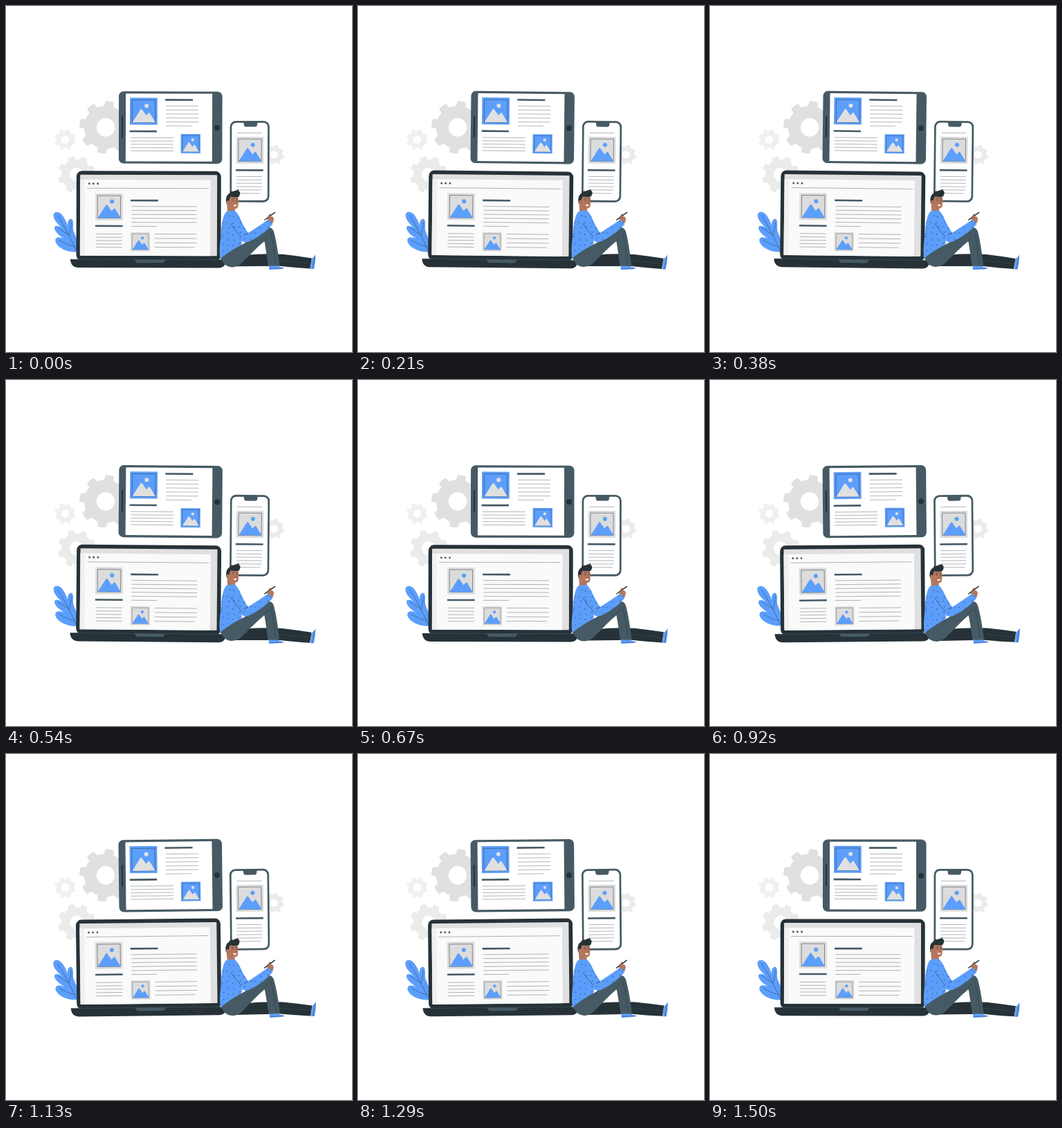
Recreate the animation shown at these times as an HTML page. Size 500x500 px, loop 1540 ms.

```html
<!DOCTYPE html>
<html lang="en">
<head>
<meta charset="utf-8">
<title>Responsive layouts</title>
<style>
  html, body { margin: 0; width: 100%; height: 100%; overflow: hidden; background: #fff; }
  svg { display: block; width: 100%; height: 100%; }
</style>
</head>
<body>
<svg viewBox="0 0 500 500" xmlns="http://www.w3.org/2000/svg"><g id="scene"></g></svg>
<script>
const BLUE = '#5c9efc', INK = '#263238', SLATE = '#455a64', GREY = '#dcdcdc', SKIN = '#b4765d';
const LOOP = 1540, STEPS = 37, TILT = 0.65, LEAD = 60;

const rect = (x, y, r, b, fill, rx = 0) =>
  `<rect x="${x}" y="${y}" width="${r - x}" height="${b - y}" rx="${rx}" fill="${fill}"/>`;
const dot = (x, y, r, fill) => `<circle cx="${x}" cy="${y}" r="${r}" fill="${fill}"/>`;
const shape = (d, fill, extra = '') => `<path d="${d}" fill="${fill}" ${extra}/>`;
const stroke = (d, color = INK, w = 0.6) =>
  `<path d="${d}" fill="none" stroke="${color}" stroke-width="${w}" stroke-linecap="round" stroke-linejoin="round"/>`;

// Rows of thin text rules; the last row may end early.
function rules(x, r, y, gap, n, last = r) {
  let d = '';
  for (let i = 0; i < n; i++) d += `M${x} ${y + i * gap}H${i === n - 1 ? last : r}`;
  return `<path d="${d}" stroke="${INK}" stroke-width=".45" opacity=".8"/>`;
}

function picture(x, y, size, back, front) {
  return `<g transform="translate(${x} ${y}) scale(${size / 39.5})">
    ${rect(0, 0, 39.5, 38.8, back)}
    <rect x="3.2" y="3.2" width="33.2" height="32.4" fill="none" stroke="${INK}" stroke-width=".5"/>
    ${shape('M3.6 35.4L15 17.4Q16.3 15.3 17.8 17.4L23.6 25.6L26.2 22.4Q27.6 20.8 28.9 22.6L36.7 35.4Z', front)}
    ${dot(24, 11.7, 3, front)}</g>`;
}

function gear(cx, cy, out, hole, teeth, phase, fill) {
  const step = 2 * Math.PI / teeth, root = out * 0.82;
  const at = (a, r) => `${(cx + r * Math.cos(a)).toFixed(2)} ${(cy + r * Math.sin(a)).toFixed(2)}`;
  let d = '';
  for (let i = 0; i < teeth; i++) {
    const a = phase * Math.PI / 180 + i * step;
    d += `${i ? 'L' : 'M'}${at(a - step * .29, root)}L${at(a - step * .2, out)}` +
      `A${out} ${out} 0 0 1 ${at(a + step * .2, out)}L${at(a + step * .29, root)}` +
      `A${root} ${root} 0 0 1 ${at(a + step * .71, root)}`;
  }
  d += `ZM${cx - hole} ${cy}a${hole} ${hole} 0 1 0 ${2 * hole} 0a${hole} ${hole} 0 1 0 ${-2 * hole} 0Z`;
  return shape(d, fill, 'fill-rule="evenodd"');
}

function gears() {
  return gear(144, 175.3, 38, 13.3, 8, -81, '#e0e0e0') +
    gear(102, 243.5, 27, 10, 8, -64, '#ebebeb') +
    gear(85.5, 193, 15.3, 5.8, 8, -70, '#f0f0f0') +
    gear(387.5, 215, 14.6, 5.6, 8, -75, '#ebebeb');
}

function leaf() {
  return shape('M102 355.5C90 356 74 350 71.5 340C70.5 333.5 78 333 85 336.5' +
      'C77 332 70 326 70 320.5C70.5 316.5 76 317.5 81 320.5' +
      'C74 315 68 308 68.5 301.5C70 295.5 78 297 82 303C85 307.5 87.5 312 89 317.5' +
      'C88.8 311 91 307.5 94 307.5C98 308.5 97 316 97 322C97.5 328 103 334 103 343Z', BLUE) +
    stroke('M74.5 302.5Q87 322 101.5 353M77 338.5Q89 346 99.5 348M94 312Q94.5 321 92 329M75 320.5Q84 327 92 331', INK, .45);
}

function tablet() {
  return rect(163, 123.5, 312.5, 227.8, SLATE, 7) +
    rect(173, 126.7, 298, 224.6, '#fff') +
    rect(167, 159.5, 169, 191, INK, 1) + dot(305, 175.8, 4, INK) +
    picture(179, 132.7, 39.7, BLUE, '#e0e0e0') +
    rect(230, 134.3, 270, 136.9, SLATE) +
    rules(231, 278, 144.5, 5.75, 6, 268) +
    rect(178.7, 179.9, 218, 182.5, SLATE) +
    rules(180, 242, 190.5, 4.75, 5, 242) +
    picture(252.7, 185, 28.3, BLUE, '#e0e0e0');
}

function phone() {
  return rect(323.5, 166, 380.7, 283.6, SLATE, 8.5) +
    rect(326.2, 168.8, 378, 280.8, '#fff', 6) +
    shape('M342.5 168H364Q362.8 169 362.7 172Q362.5 174.6 359.5 174.6H347Q344 174.6 343.8 172Q343.7 169 342.5 168Z', SLATE) +
    rules(334, 370, 183.5, 1, 1) +
    picture(332.7, 189, 39.5, GREY, BLUE) +
    rect(332, 236, 371.7, 238.6, SLATE) +
    rules(333, 370, 246.5, 4.85, 6, 368);
}

function laptop() {
  return rect(101.7, 238.5, 310.6, 368, INK, 8) +
    rect(107, 244, 305, 361, '#e0e0e0', 1) +
    rect(107, 251, 114, 361, '#f0f0f0') +
    rect(113.7, 251.2, 295.3, 361, '#fafafa') +
    [120.2, 126.2, 132.5].map(x => dot(x, 257, 1.45, SLATE)).join('') +
    rules(117, 293, 263.5, 1, 1) +
    picture(129, 271, 39.6, GREY, BLUE) +
    rect(180, 279.8, 219.8, 282.4, SLATE) +
    rules(181, 276, 289.7, 5.75, 6, 218) +
    rect(129, 316.8, 168.7, 319.3, SLATE) +
    rules(130, 168, 329.5, 4.85, 5) +
    picture(180.2, 327, 28, GREY, BLUE) +
    rules(215, 276, 329.5, 6.35, 4, 273) +
    shape('M93 366.3H318.5Q318 378.3 307 378.3H105Q94 378.3 93 366.3Z', INK) +
    stroke('M94 366.4H318', SLATE, .5) +
    shape('M186 366.5H230.5L228.3 370.2Q227.7 371.2 226 371.2H190.5Q188.7 371.2 188.2 370.2Z', SLATE);
}

// Short seeded dashes on the sweater.
function flecks() {
  let seed = 11, d = '';
  const rnd = () => (seed = (seed * 16807) % 2147483647) / 2147483647;
  for (let y = 302; y < 368; y += 8) {
    for (let x = 311; x < 384; x += 8) {
      const a = rnd() * Math.PI, px = x + rnd() * 4, py = y + rnd() * 4;
      d += `M${px.toFixed(1)} ${py.toFixed(1)}l${(1.7 * Math.cos(a)).toFixed(1)} ${(1.7 * Math.sin(a)).toFixed(1)}`;
    }
  }
  return stroke(d, INK, .55);
}

const knit = (id, d) => `<clipPath id="${id}"><path d="${d}"/></clipPath>` +
  shape(d, BLUE) + `<g clip-path="url(#${id})">${flecks()}</g>`;

function man() {
  const torso = 'M319 297C314 301 312 312 311 326C309.5 342 307.5 355 310 366C317 371 332 360 341 343L337 310Q334 297 330 296Z';
  const arm = 'M329 296C335 298 338 307 342 315Q347 324 350 328Q364 319 379.5 308.5L385.5 315C375 327 362 336 350 341Q343 343 337 336L323 318Z';
  // far leg
  return shape('M332 376.5L346 360Q370 357.5 400 358.8Q420 361 442 364.2L439.5 379.3Q420 378.3 396 375.8Z', INK) +
    stroke('M394 367.5Q415 369 436 371.5', SLATE, .4) +
    shape('M442 365Q445.5 362.5 447.6 358.6Q447.6 370 445.3 379.8H439.8Z', BLUE) +
    stroke('M446.2 362L443.5 379', INK, .5) +
    // head
    shape('M319 284L320 298Q325 302 331 296L330.5 291Z', SKIN) +
    shape('M320.5 276Q328 272 335 275Q336.5 283 335.3 290Q333.5 294 328 293Q321 290.5 320 284Z', SKIN) +
    shape('M318.5 286C317 280 318 274 322 271.5C324 271 323 267.5 327 268C330 268.5 331 266 334 266.5' +
      'C335 264.5 337 265.5 336 267.5C339 268 338.5 272 336.5 275.5C331 277.5 327 275.5 324 276C322.5 279 322.5 282 321.5 285Z', INK) +
    dot(320.5, 283.5, 2.2, SKIN) +
    dot(328.3, 281.5, .65, INK) + dot(333.8, 281.3, .65, INK) +
    stroke('M326.7 279.3l2.8-.6M332.7 278.8l2 .4', INK, .6) +
    stroke('M331.8 281.8L333 285H331.5', '#8a503e', .45) +
    shape('M328.2 287.3Q331 288.3 333.4 287Q332.5 290.3 330.3 289.8Q328.8 289.2 328.2 287.3Z', '#fff') +
    // body and near leg
    knit('torso', torso) +
    shape('M310.5 365C318 358 334 348 344.5 343C354 336 364 326 375 320.5Q384 317.5 387 326C391 340 393.5 358 395.5 375L379 376' +
      'C377 362 375.5 350 373.5 340C361 350 349 364 338 374Q327 380.5 318 375Q313 371 310.5 365Z', SLATE) +
    stroke('M373.5 340Q375 335 379 331M383 329Q388 350 390 373', INK, .45) +
    stroke('M375.5 360L377.5 375', INK, 1.5) +
    shape('M380 375.5H392Q396 377 402 378.2Q401 380 396 380.2L380.5 381Z', BLUE) +
    stroke('M381 379.5Q391 379.7 400 378.8', INK, .4) +
    // arm, hand and stylus
    shape('M377.5 309C378 304 380 300.5 382.5 300L383 304Q386.5 304 387 308Q387 312 384 315Z', SKIN) +
    knit('arm', arm) +
    stroke('M325 315Q332 326 340 334M350 328Q347 330.5 344 331', INK, .55) +
    stroke('M373.8 309L388.5 298.3', INK, 1.5) +
    shape('M378 308Q379 303.5 382 303L385 306L381 309.5Z', SKIN);
}

// Every object rocks around its own centre.
const rockers = [
  [leaf, 85.5, 326], [tablet, 237.8, 175.6], [phone, 352.1, 224.8],
  [laptop, 205.8, 308.4], [man, 378, 323]
];

const scene = document.getElementById('scene');
scene.innerHTML = gears() + rockers.map(([part]) => `<g class="rock">${part()}</g>`).join('');
const groups = [...scene.querySelectorAll('.rock')];

function draw(ms) {
  const step = Math.floor((ms % LOOP) / LOOP * STEPS);
  const angle = TILT * Math.sin(2 * Math.PI * (step / STEPS + LEAD / LOOP));
  groups.forEach((g, i) => {
    const [, x, y] = rockers[i];
    g.setAttribute('transform', `rotate(${angle.toFixed(4)} ${x} ${y})`);
  });
}

let start;
function tick(now) {
  start ??= now;
  draw(Math.max(0, now - start));
  requestAnimationFrame(tick);
}
draw(0);
requestAnimationFrame(tick);
</script>
</body>
</html>
```
